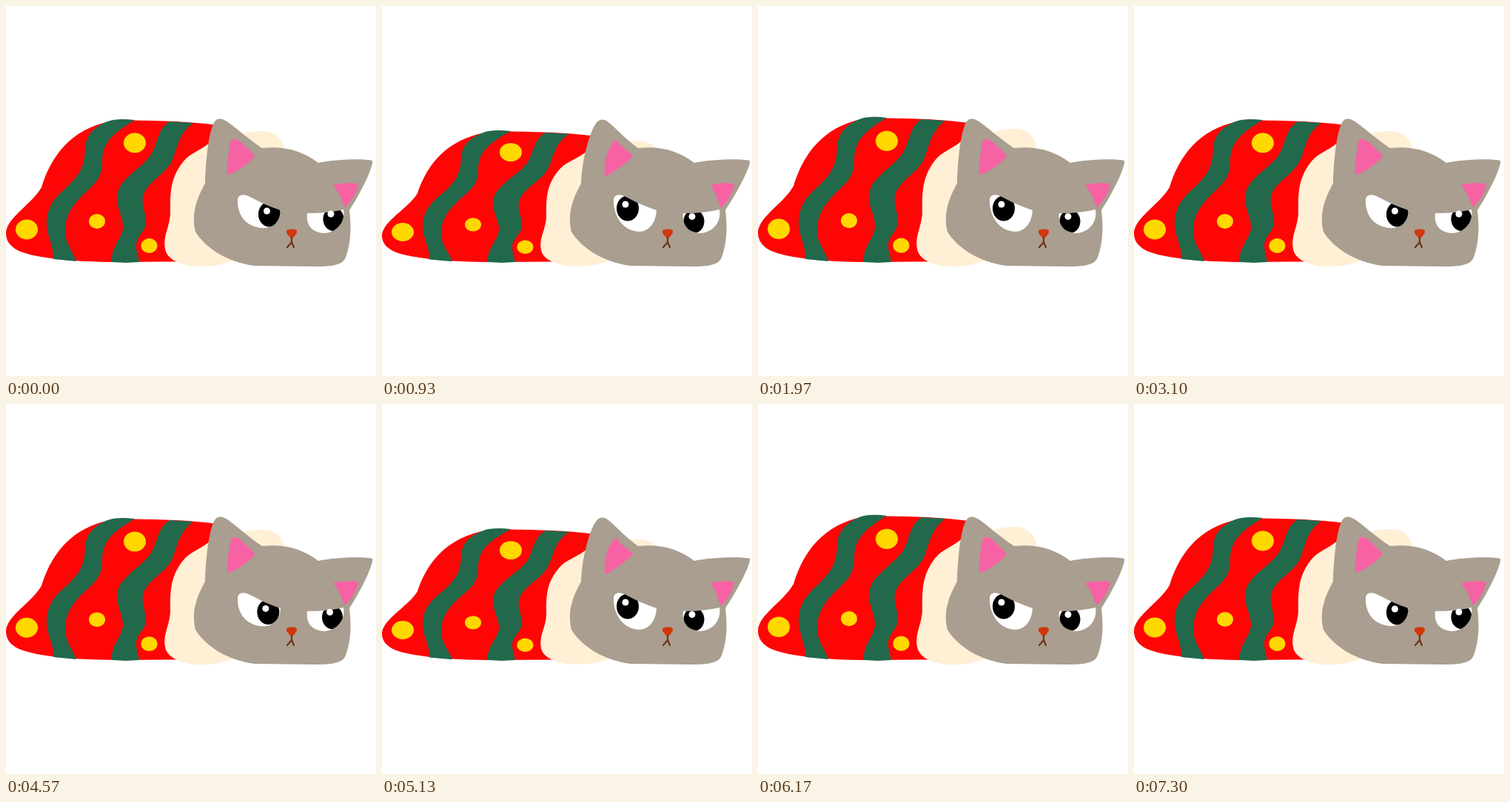
An HTML page for the animation above (8410 ms loop, 500x500 px).

```html
<!DOCTYPE html>
<html lang="en">
<head>
<meta charset="utf-8">
<title>Cat in a blanket</title>
<style>
  html, body { margin: 0; width: 100%; height: 100%; overflow: hidden; background: #fff; }
  svg { display: block; width: 100vw; height: 100vh; }
</style>
</head>
<body>
<svg viewBox="0 0 500 500">
  <defs>
    <clipPath id="lidL"><path id="eyeL"/></clipPath>
    <clipPath id="lidR"><path id="eyeR" d="M407 280Q436 280 456 275C459 291 448 306 430 307C414 306 405 297 407 280Z"/></clipPath>
  </defs>

  <g id="blanket">
    <path fill="#ff0505" d="M0 306C2 285 35 268 48 245C56 219 74 178 122 161Q148 152 172 154.500C210 155 250 156 285 161V345L150 346C90 346 30 340 12 328C2 321 0 314 0 306Z"/>
    <g fill="#22694c">
      <path d="M137 156C118 164 108 175 107 193C106 212 104 224 83 244C63 261 55 274 55 295C56 314 65 325 64 342L95 345C90 330 81 323 80 306C80 285 87 273 103 256C123 238 129 232 130 212C130 186 141 174 174 154Q150 151 137 156Z"/>
      <path d="M221 156C206 166 206 180 199 195C191 214 163 227 153 246C144 268 160 284 158 301C155 317 142 325 143 346L162 347L180 346C178 334 174 327 177 317C183 305 190 302 189 288C187 274 181 262 188 250C200 231 219 225 226 205C233 187 234 172 253 158Z"/>
    </g>
    <g fill="#ffd800">
      <ellipse cx="174" cy="185" rx="15" ry="13.500"/>
      <ellipse cx="28" cy="302" rx="15" ry="13.500"/>
      <ellipse cx="123" cy="291" rx="11" ry="10"/>
      <ellipse cx="193.500" cy="324" rx="11" ry="10"/>
    </g>
    <path fill="#ffefd5" d="M330 170C355 167 367 169 376 189L370 240L305 345C288 351 270 353 255 352C235 350 217 342 215 328C212 310 221 300 222 280C222 255 221 234 239 211C248 199 260 197 275 185Z"/>
  </g>

  <path id="head" fill="#a99e8f"/>
  <path id="ears" fill="#f762a4" stroke="#f762a4" stroke-width="4" stroke-linejoin="round"/>

  <g fill="#fff"><use href="#eyeL"/><use href="#eyeR"/></g>
  <g clip-path="url(#lidL)"><ellipse id="pupilL"/></g>
  <g clip-path="url(#lidR)"><ellipse id="pupilR"/></g>
  <circle id="glintL" r="4.500" fill="#fff"/>
  <circle id="glintR" r="4.500" fill="#fff"/>

  <path fill="#d0360a" d="M380 302.500Q386 300.500 392 302.500Q396 306 386 314.500Q376 306 380 302.500Z"/>
  <path fill="none" stroke="#6e3418" stroke-width="2.200" stroke-linecap="round" stroke-linejoin="round" d="M386 313V319L380 326M386 319L389 326"/>
</svg>
<script>
const LOOP = 8410, CYCLE = 4200;
const get = id => document.getElementById(id);
const mix = (a, b, p) => a + (b - a) * p;
const clamp = p => Math.min(1, Math.max(0, p));
const ease = p => (1 - Math.cos(Math.PI * clamp(p))) / 2;
const set = (id, attrs) => {
  for (const k in attrs) get(id).setAttribute(k, attrs[k]);
};

// Blanket height as [time, scale]: breathe out, rest, breathe in, rest
const breaths = [[300, 1], [765, 0.895], [1235, 1], [1670, 1.031], [2270, 1]];

function breathAt(t) {
  for (let i = 1; i < breaths.length; i++) {
    const [t0, a] = breaths[i - 1], [t1, b] = breaths[i];
    if (t < t1) return mix(a, b, ease((t - t0) / (t1 - t0)));
  }
  return 1;
}

// Hold each pose for one step
const hold = (t, start, step) => start + Math.floor((t - start) / step) * step;

function drawHead(d) {
  const x = v => v + 9 * d, y = v => v + d, r = v => v + 2 * d;
  set('head', { d: `M269 240C270 205 ${x(275)} ${y(155)} ${x(286)} ${y(153)}
    C${x(297)} ${y(149)} ${313 + 3 * d} 170 346 192C375 189 400 195 422 212
    C445 207 ${r(485)} 206 ${r(495)} 209C${r(497)} 216 480 252 464 276
    C467 300 466 320 459 340C454 352 435 352 415 352L335 351
    C300 346 270 328 256 305C250 280 258 260 269 240Z` });
  set('ears', { d: `M${306 + 9 * d} ${182 + 2 * d}Q${312 + 7 * d} ${181 + 2 * d} 318 187
    L${334 + 3 * d} 203Q320 218 ${301 + 2 * d} ${226 + 2 * d}Q301 203 ${306 + 9 * d} ${182 + 2 * d}Z
    M${445 + 2 * d} 243Q460 240 474 242Q470 258 458 ${269 + d}Q454 253 ${445 + 2 * d} 243Z` });
}

// look: 0 = right, 1 = left
function drawEyes(look) {
  const at = (a, b) => mix(a, b, look), low = at(300, 305);
  set('eyeL', { d: `M313 263C313 254 322 253 332 259Q350 269 371 276
    C370 293 361 ${low} 347 ${low}C327 ${low - 1} 313 286 313 263Z` });
  set('pupilL', { cx: at(356, 332), cy: at(281.5, 273.5), rx: at(15, 15), ry: 17 });
  set('pupilR', { cx: at(442.5, 421.5), cy: at(288, 291), rx: 14, ry: 16 });
  set('glintL', { cx: at(352.5, 329), cy: at(277, 268) });
  set('glintR', { cx: at(439, 419), cy: at(281, 284.5) });
}

function draw(now) {
  const t = now % LOOP % CYCLE;
  const s = t < 370 ? 1 : breathAt(hold(t, 370, 69.2));
  const left = t < 370 ? 0 : ease((hold(t, 370, 69.2) - 300) / 415);
  const right = t < 2730 ? 0 : ease((hold(t, 2730, 74) - 2656) / 444);
  get('blanket').setAttribute('transform', `translate(0 347) scale(1 ${s}) translate(0 -347)`);
  drawHead(Math.max(0, (1 - s) / 0.08));
  drawEyes(left - right);
}

const begin = performance.now();
function tick() {
  draw(performance.now() - begin);
  requestAnimationFrame(tick);
}
tick();
</script>
</body>
</html>
```
